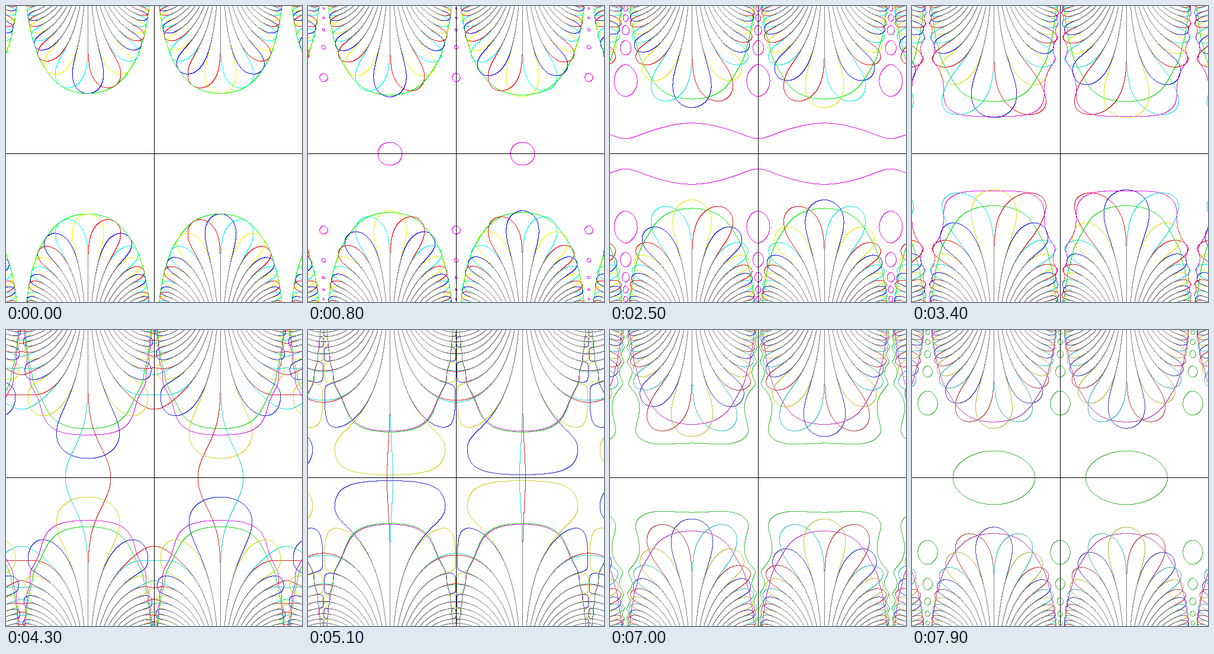
Animation, 500 px wide and 500 px high, one loop 8000 ms. Source, as a matplotlib script:

```python
import numpy as np
import matplotlib.pyplot as plt
from matplotlib.animation import FuncAnimation

SIZE, FRAMES, INTERVAL = 500, 80, 100
STEP = 7 / (SIZE - 1)        # the plane runs from -3.5 to 3.5
TOP = 3.5                    # highest level
FADE = 0.9                   # loss of saturation per step

RED, CYAN = (1, 0, 0), (0, 1, 1)
BLUE, YELLOW = (0, 0, 1), (1, 1, 0)
GREEN, MAGENTA = (0, 1, 0), (1, 0, 1)

# rows run upwards; one extra row and column give each pixel its neighbours
axis = -3.5 + STEP * np.arange(-1, SIZE)
x, y = np.meshgrid(axis, axis)
f = np.sin(np.cos(x + 1j * y))
re, im, mod = f.real, f.imag, np.abs(f)


def contour(field, level):
    """Pixels where the field crosses the level."""
    above = field >= level
    here = above[1:, 1:]
    return (here != above[1:, :-1]) | (here != above[:-1, 1:])


axes_mask = contour(x, 0) | contour(y, 0)


def render(n):
    c = TOP * (1 - n / 50)
    curves = [
        (re, c, RED), (re, -c, CYAN),
        (im, c, BLUE), (im, -c, YELLOW),
        (mod, TOP * (1 - n / 100), GREEN),
        (mod, TOP * n / 100, MAGENTA),
    ]
    low = FADE * n
    total = np.zeros((SIZE, SIZE, 3))
    count = np.zeros((SIZE, SIZE, 1))
    for field, level, color in curves:
        hit = contour(field, level)
        total[hit] += low + (255 - 2 * low) * np.array(color)
        count[hit] += 1
    # crossing curves mix evenly
    img = np.where(count > 0, total / np.maximum(count, 1), 255)
    img[axes_mask] = 0
    return img.astype(np.uint8)


fig = plt.figure(figsize=(SIZE / 100, SIZE / 100), dpi=100)
ax = fig.add_axes([0, 0, 1, 1])
ax.axis("off")
picture = ax.imshow(render(0), origin="lower", interpolation="nearest",
                    aspect="auto")


def update(n):
    picture.set_data(render(n))
    return [picture]


anim = FuncAnimation(fig, update, frames=FRAMES, interval=INTERVAL,
                     repeat=True, repeat_delay=0, blit=False)
plt.show()
```
